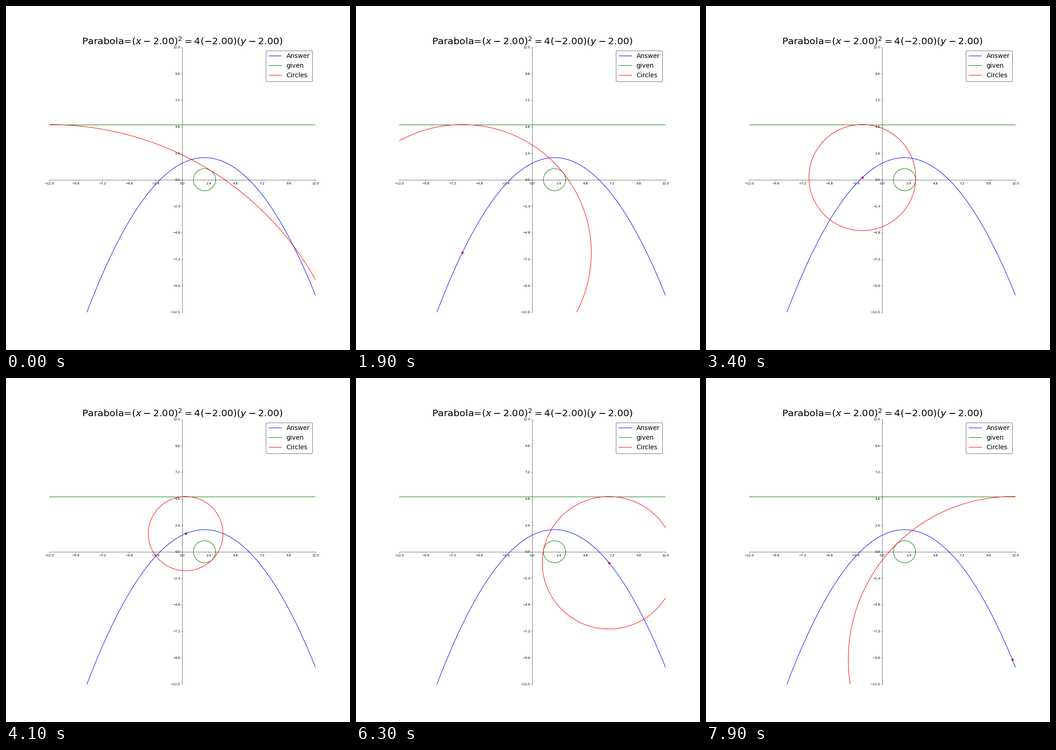
Animation of 748x748 px, one loop 8000 ms. Source, as a matplotlib script:

```python
import numpy as np
import matplotlib.pyplot as plt
from matplotlib.animation import FuncAnimation

SIZE_PX, INCHES = 748, 15
FRAMES, INTERVAL = 80, 100
LIMIT = 12
FOCUS = VERTEX = (2, 0)
LINE_Y, RADIUS = 5, 1
H, K, P = 2, 2, -2

plt.rcParams["font.family"] = "DejaVu Sans"
angle = np.linspace(0, 2 * np.pi, 721)


def parabola(x):
    return K + (x - H) ** 2 / (4 * P)


def circle(cx, cy, r):
    return cx + r * np.cos(angle), cy + r * np.sin(angle)


fig, ax = plt.subplots(figsize=(INCHES, INCHES), dpi=SIZE_PX / INCHES)
fig.subplots_adjust(left=0.125, right=0.9, bottom=0.11, top=0.88)

# Axes cross at the origin
for side in ("top", "right"):
    ax.spines[side].set_visible(False)
for side in ("left", "bottom"):
    ax.spines[side].set_position(("data", 0))
ticks = np.linspace(-LIMIT, LIMIT, 11)
labels = [f"{t:.1f}".replace("-", "\u2212") for t in ticks]
ax.set_xticks(ticks, labels)
ax.set_yticks(ticks, labels)
ax.set_xlim(-LIMIT, LIMIT)
ax.set_ylim(-LIMIT, LIMIT)
ax.set_title(
    f"Parabola=$(x-{H:.2f})^{{2}}=4({P:.2f})(y-{K:.2f})$", fontsize=30
)

xs = np.linspace(-LIMIT, LIMIT, 500)
ax.plot(xs, parabola(xs), color="blue", label="Answer")
ax.plot([-LIMIT, LIMIT], [LINE_Y, LINE_Y], color="green", label="given")
ax.plot(*circle(*FOCUS, RADIUS), color="green")
(moving,) = ax.plot([], [], color="red", label="Circles")
center = ax.scatter([], [], s=36, color="red", zorder=1)
ax.legend(loc="upper right", fontsize=20, edgecolor="black")


def update(frame):
    # The circle touches both the line and the small circle
    x = -LIMIT + 2 * LIMIT * frame / FRAMES
    y = parabola(x)
    moving.set_data(*circle(x, y, LINE_Y - y))
    center.set_offsets([(x, y)])
    return moving, center


anim = FuncAnimation(
    fig, update, frames=FRAMES, interval=INTERVAL, repeat=True, repeat_delay=0
)
plt.show()
```
